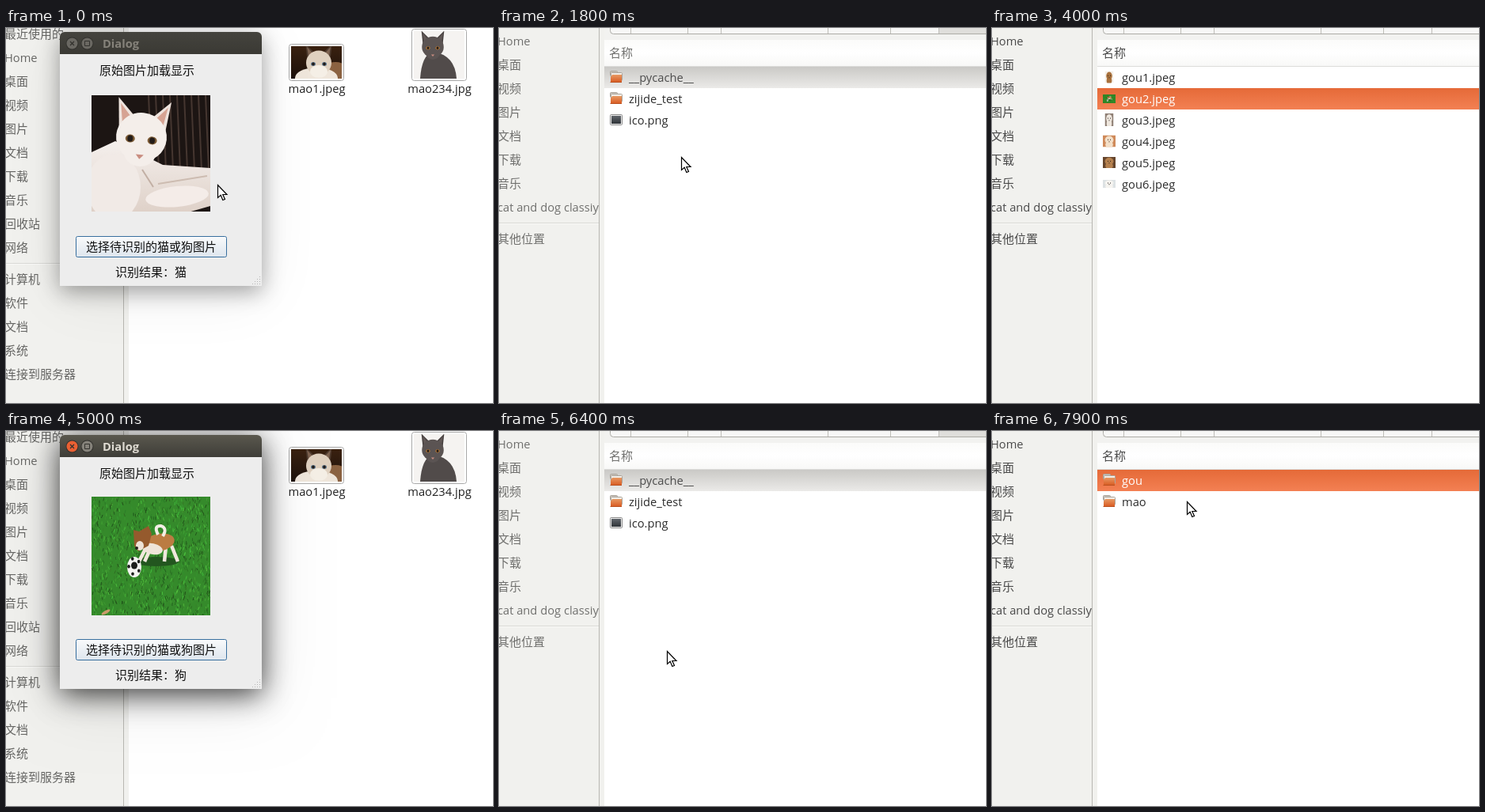
Recreate the animation shown at these times as an HTML page with a canvas. Size 615 px wide and 474 px high, loop 8000 ms.

```html
<!DOCTYPE html>
<html lang="zh-CN">
<head>
<meta charset="utf-8">
<style>
html, body { margin: 0; width: 100%; height: 100%; overflow: hidden; background: #fff; }
canvas { display: block; }
</style>
</head>
<body>
<canvas id="stage" width="615" height="474"></canvas>
<script>
const c = document.getElementById('stage').getContext('2d');
const LOOP = 8000, STEP = 100, ROW = 27;

// ---- drawing helpers ----
function rect(x, y, w, h, fill) {
  c.fillStyle = fill;
  c.fillRect(x, y, w, h);
}
function fade(y, h, ...colors) {
  const g = c.createLinearGradient(0, y, 0, y + h);
  colors.forEach((color, i) => g.addColorStop(i / (colors.length - 1), color));
  return g;
}
function oval(x, y, rx, ry, fill, turn = 0) {
  c.beginPath();
  c.ellipse(x, y, rx, ry, turn, 0, 7);
  c.fillStyle = fill;
  c.fill();
}
function shape(d, fill, stroke, width = 1) {
  const p = new Path2D(d);
  c.fillStyle = fill;
  c.fill(p);
  if (!stroke) return;
  c.strokeStyle = stroke;
  c.lineWidth = width;
  c.stroke(p);
}
function line(color, width, x0, y0, x1, y1) {
  c.beginPath();
  c.moveTo(x0, y0);
  c.lineTo(x1, y1);
  c.strokeStyle = color;
  c.lineWidth = width;
  c.stroke();
}
function box(x, y, w, h, r, fill, stroke) {
  c.beginPath();
  c.roundRect(x, y, w, h, r);
  c.fillStyle = fill;
  c.fill();
  if (!stroke) return;
  c.strokeStyle = stroke;
  c.lineWidth = 1;
  c.stroke();
}
function text(s, x, mid, color, weight = 400, align = 'left') {
  const size = s.charCodeAt(0) > 255 ? 15 : 14.7;
  c.font = `${weight} ${size}px "Open Sans", "Noto Sans CJK SC", "Noto Sans CJK", sans-serif`;
  c.textAlign = align;
  c.fillStyle = color;
  c.fillText(s, x, mid + 5);
}
function at(x, y, paint, scale = 1) {
  c.save();
  c.translate(x, y);
  c.scale(scale, scale);
  paint();
  c.restore();
}
function picture(x, y, w, h, paint) {
  at(x, y, () => {
    c.beginPath();
    c.rect(0, 0, w, h);
    c.clip();
    paint();
  });
}
function random(seed) {
  return () => (seed = seed * 16807 % 2147483647) / 2147483647;
}

// ---- pictures ----
// A cat's head around (0, 0), about 64 wide.
function catHead(fur, ears, inner, iris) {
  for (const side of [-1, 1]) {
    at(side * 23, -26, () => {
      c.rotate(side * .45);
      shape('M-15 18L0 -24L15 18Z', ears);
      shape('M-8 12L0 -16L8 12Z', inner);
    });
  }
  oval(0, 0, 32, 31, fur);
  oval(0, 20, 20, 17, fur);
  for (const x of [-14, 14]) {
    oval(x, 3, 6, 5, iris);
    oval(x, 3, 3.5, 4, '#231c18');
  }
  shape('M-5 22H5L0 28Z', '#c98d80');
}
function whiteCat() {
  rect(0, 0, 150, 150, '#1c1513');
  for (let x = 72; x < 150; x += 9) line('#453630', 2, x, 0, x + 4, 95);
  shape('M0 72L30 58L90 88L150 92V140L115 150H0Z', fade(60, 90, '#f4efec', '#ded0c7'));
  oval(28, 116, 34, 42, '#f1eae6');
  oval(108, 128, 40, 13, '#f4ece8', -.1);
  line('#c2afa4', 2, 64, 94, 78, 116);
  line('#cdbcb1', 2, 84, 112, 146, 102);
  at(63, 53, () => {
    c.rotate(.1);
    catHead('#f4eeea', '#eee4de', '#d6a393', '#7b5a35');
  });
}
function brownCat() {
  rect(0, 0, 64, 41, fade(0, 41, '#3a2110', '#1d110b'));
  oval(56, 34, 18, 14, '#8b6241');
  oval(32, 40, 27, 13, '#efe6db');
  at(35, 21, () => {
    catHead('#dfd0bf', '#4b382c', '#7d6250', '#5d7790');
    oval(0, 22, 22, 16, '#f5efe6');
  }, .5);
}
function greyCat() {
  rect(0, 0, 64, 60, '#f5f3f1');
  shape('M8 60Q10 30 24 26Q52 30 54 60Z', '#514b4a');
  at(24, 20, () => catHead('#5b5453', '#474140', '#625957', '#c47f34'), .43);
}
function dogOnGrass() {
  rect(0, 0, 150, 150, '#358a2b');
  const rnd = random(71);
  for (let i = 0; i < 1500; i++) {
    const x = rnd() * 150, y = rnd() * 150;
    line(`hsl(${108 + rnd() * 10} 52% ${20 + rnd() * 30}%)`, 1, x, y, x + rnd() * 4 - 2, y + 4);
  }
  oval(82, 82, 28, 6, '#23561f');
  for (const [x, foot] of [[70, 60], [76, 67], [94, 92], [101, 109]]) line('#f0e8dd', 4.5, x, 62, foot, 82);
  oval(85, 58, 20, 11, '#bb7c42', -.2);
  oval(77, 66, 13, 7, '#efe5d9', .2);
  shape('M84 48Q78 36 88 37Q96 40 90 50', 'transparent', '#f3eee5', 4);
  shape('M53 42L60 44L72 37L76 47L72 62L59 69L54 62Z', '#955a2d');
  oval(61, 62, 5, 6, '#eee3d6');
  oval(57, 65, 2, 2, '#26201c');
  oval(54, 89, 9, 13, '#f4f4f2');
  oval(54, 87, 4, 4.5, '#1b1d1b');
  for (let a = .6; a < 6; a += 1.26) oval(54 + 7 * Math.cos(a), 88 + 10 * Math.sin(a), 1.8, 2.2, '#1b1d1b');
  oval(18, 146, 6, 2, '#c99b6b', -.5);
}

// ---- list icons, 16 px square ----
function folder() {
  box(.5, .5, 9, 6, 1, '#c9c4bc', '#aaa49b');
  box(1.5, 2.5, 14, 10, 1, '#f2eee8', '#aaa49b');
  shape('M3 5H15V14H1V8Z', fade(4, 11, '#e9a06a', '#d8581f'));
  line('#b9501f', 1, .5, 14.5, 15, 14.5);
}
function monitor() {
  box(.5, 1.5, 15, 13, 1, '#eee', '#8b8b8b');
  rect(2, 3, 12, 10, fade(3, 10, '#60656b', '#303439'));
}
function pet(w, h, ground, fur) {
  return () => picture(8 - w / 2, 8 - h / 2, w, h, () => {
    rect(0, 0, w, h, ground);
    oval(w / 2, h * .8, w * .3, h * .3, fur);
    oval(w / 2, h * .4, w * .34, h * .34, fur);
    for (const x of [-2, 1]) rect(w / 2 + x, h * .35, 1, 1, '#2a211c');
    rect(w / 2 - .5, h * .52, 1, 1, '#2a211c');
  });
}

const homeRows = [[folder, '__pycache__'], [folder, 'zijide_test'], [monitor, 'ico.png']];
const testRows = [[folder, 'gou'], [folder, 'mao']];
const dogRows = [
  pet(11, 15, '#f4efe8', '#a9713c'),
  () => picture(0, 3, 16, 11, () => at(0, -2, dogOnGrass, .107)),
  pet(11, 16, '#8f7f74', '#efe7de'),
  pet(16, 15, '#cf8a5a', '#f3dfc8'),
  pet(16, 14, '#65452c', '#b5814f'),
  pet(16, 10, '#dde2e4', '#f6f4f0')
].map((icon, i) => [icon, `gou${i + 1}.jpeg`]);

// ---- windows ----
function sidebar(width, top, labels, gapAt, color) {
  const sep = top + 30 * gapAt - 11;
  rect(0, 0, width + 7, 474, '#f1f1ee');
  rect(width, 0, 1, 474, '#b8b7b2');
  rect(0, sep, width, 1, '#d9d9d5');
  rect(0, sep + 1, width, 1, '#fafaf8');
  picture(0, 0, width, 474, () =>
    labels.forEach((s, i) => text(s, -2, top + 30 * i + (i >= gapAt ? 10 : 0), color)));
}
function thumb(x, y, w, h, paint, label) {
  box(x + .5, y + .5, w - 1, h - 1, 3, '#fff', '#a9a9a9');
  picture(x + 3, y + 3, w - 6, h - 6, paint);
  text(label, x + w / 2 + .5, 77, '#222', 400, 'center');
}
function shadow(alpha, blur, drop) {
  c.save();
  c.shadowColor = `rgba(0,0,0,${alpha})`;
  c.shadowBlur = blur;
  c.shadowOffsetY = drop;
  box(68, 5, 255, 321, [6, 6, 0, 0], '#ededed');
  c.restore();
}

const buttonFills = { rest: ['#fafbfc', '#dde5ed'], hover: ['#fff', '#e9f0f7'], down: ['#cdd7e1', '#d7e0e9'] };

function resultWindow(dog, active, button) {
  sidebar(148, 8, ['最近使用的', 'Home', '桌面', '视频', '图片', '文档', '下载', '音乐',
    '回收站', '网络', '计算机', '软件', '文档', '系统', '连接到服务器'], 10, '#666664');
  thumb(357, 20, 70, 47, brownCat, 'mao1.jpeg');
  thumb(512, 1, 70, 66, greyCat, 'mao234.jpg');

  shadow(active ? .12 : .07, 80, 12);
  shadow(active ? .75 : .36, active ? 36 : 28, 7);
  box(68, 5, 255, 28, [6, 6, 0, 0], active ? fade(5, 28, '#5a584e', '#3e3d38') : fade(5, 28, '#45443e', '#3a3934'));
  const grey = active ? '#85827a' : '#6a6862', dark = '#33322e';
  [active ? '#ea6033' : grey, grey].forEach((fill, i) => {
    oval(83.5 + 19 * i, 19.5, 8, 8, dark);
    oval(83.5 + 19 * i, 19.5, 7, 7, fill);
  });
  line(dark, 1.3, 81, 17, 86, 22);
  line(dark, 1.3, 86, 17, 81, 22);
  shape('M99.5 16.5h6v6h-6Z', 'transparent', dark);
  text('Dialog', 122, 20, active ? '#dfdbd2' : '#85827a', 700);

  text('原始图片加载显示', 118, 54, '#111');
  if (dog) picture(108, 83, 150, 150, dogOnGrass);
  else picture(108, 85, 150, 147, whiteCat);
  box(88.5, 263.5, 190, 26, 2, fade(263, 27, ...buttonFills[button]), '#386f9f');
  text('选择待识别的猫或狗图片', 101, 277, '#111');
  text('识别结果：' + (dog ? '狗' : '猫'), 138, 309, '#111');
  for (let i = 0; i < 4; i++)
    for (let j = 0; j <= i; j++) rect(320 - 3 * j, 314 + 3 * i, 1, 1, '#b5b5b5');
}

function fileWindow(rows, selected, active) {
  const ink = active ? '#4a4a4a' : '#70706e';
  sidebar(126, 17, ['Home', '桌面', '视频', '图片', '文档', '下载', '音乐',
    'cat and dog classiy', '其他位置'], 8, ink);
  rect(133, 0, 482, 15, '#f2f2f0');
  box(140.5, -9.5, 500, 17, 4, '#f7f7f6', '#adaca7');
  if (rows === homeRows) rect(556, 0, 59, 7, '#dfdedb');
  for (const x of [166, 238, 280, 415, 494, 555]) rect(x, 0, 1, 7, '#bebdb8');
  rect(133, 15, 482, 33, fade(15, 33, '#fbfbfa', '#fff', '#f8f8f7'));
  rect(133, 48, 482, 1, '#dcdcda');
  text('名称', 139, 32, ink);
  rows.forEach(([icon, name], i) => {
    const y = 49 + ROW * i, on = i === selected;
    if (on) rect(133, y, 482, ROW, active ? fade(y, ROW, '#e56a38', '#f38053') : fade(y, ROW, '#cac9c6', '#ebeae8'));
    at(140, y + 5, icon);
    text(name, 164, y + 14, !on ? '#2b2b2b' : active ? '#fff' : '#4c4c4c');
  });
}

// ---- timeline: each scene lasts until its time ----
const scenes = [
  [600, () => resultWindow(false, false, 'rest')],
  [700, () => resultWindow(false, false, 'hover')],
  [1000, () => resultWindow(false, false, 'down')],
  [1100, () => resultWindow(false, true, 'down')],
  [2300, () => fileWindow(homeRows, 0, false)],
  [2500, () => fileWindow(homeRows, 1, true)],
  [3200, () => fileWindow(testRows, 0, true)],
  [3800, () => fileWindow(dogRows, 0, true)],
  [5000, () => fileWindow(dogRows, 1, true)],
  [6200, () => resultWindow(true, true, 'rest')],
  [6300, () => resultWindow(true, true, 'hover')],
  [6400, () => resultWindow(true, true, 'down')],
  [7200, () => fileWindow(homeRows, 0, false)],
  [7600, () => fileWindow(homeRows, 1, true)],
  [LOOP, () => fileWindow(testRows, 0, true)]
];

// Pointer moves: start, end, target x, y; it rests in between.
const moves = [
  [0, 600, 212, 267], [1500, 1800, 230, 163], [1800, 2200, 228, 83], [2600, 2900, 233, 59],
  [3100, 3500, 226, 66], [3600, 3800, 222, 82], [3800, 3900, 300, 285], [4000, 5500, 262, 362],
  [5500, 6200, 212, 278], [6400, 7100, 248, 98], [7800, 7900, 246, 89]
];
function pointer(t) {
  if (t >= 4000 && t < 5500) return;
  let x = 267, y = 198;
  for (const [from, to, tx, ty] of moves) {
    const p = Math.min(1, Math.max(0, (t - from) / (to - from)));
    x += (tx - x) * p;
    y += (ty - y) * p;
  }
  at(Math.round(x) + .5, Math.round(y) + .5, () =>
    shape('M0 0V16L3.7 12.8L6.3 19L9 18L6.3 12H11.5Z', '#fff', '#000', 1.2));
}

function draw(t) {
  rect(0, 0, 615, 474, '#fff');
  scenes.find(([end]) => t < end)[1]();
  pointer(t);
}

const start = performance.now();
let shown = -1;
function tick() {
  const t = Math.floor((performance.now() - start) % LOOP / STEP) * STEP;
  if (t !== shown) draw(shown = t);
  requestAnimationFrame(tick);
}
tick();
</script>
</body>
</html>
```
